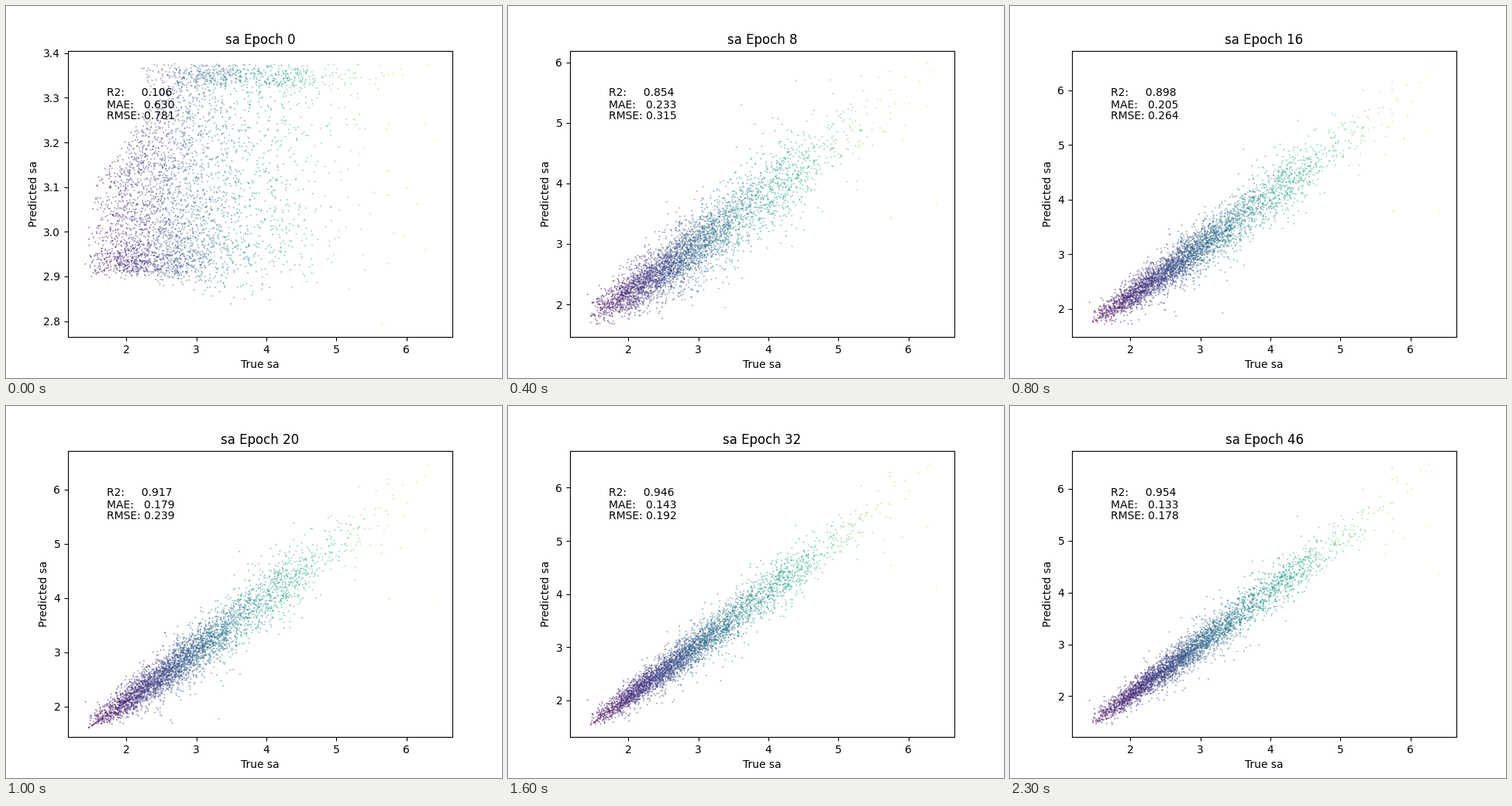
A matplotlib script for the animation above (2.4 s loop, 640 px wide and 480 px high).

```python
import numpy as np
import matplotlib.pyplot as plt
from matplotlib.animation import FuncAnimation

FRAMES, STEP = 24, 2
X_LO, X_HI = 1.417, 6.408
N = 4000
TRUE_STD = .8256

# Key points of the training log: epoch, R2, MAE, lower and upper y limit.
LOG = np.array([
    [0, .106, .630, 2.7643, 3.4054],
    [8, .854, .233, 1.461, 6.192],
    [16, .898, .205, 1.479, 6.730],
    [24, .935, .154, 1.393, 6.711],
    [32, .946, .143, 1.312, 6.698],
    [40, .950, .138, 1.230, 6.788],
    [46, .9537, .133, 1.212, 6.738],
])

# Outliers: true value, first prediction, early error, late error.
OUTLIERS = np.array([
    [X_LO, 2.928, .75, .50],
    [5.65, 2.793, -.80, -.90],
    [5.75, 3.240, -2.32, -.57],
    [6.27, 2.960, -1.00, -1.00],
    [6.27, 3.240, -.10, .20],
    [X_HI, 3.207, -2.76, -2.05],
])

rng = np.random.default_rng(7)


def true_values():
    x = np.concatenate([rng.gamma(4.6, .38, N - 150) + 1.15,
                        rng.normal(4.3, .2, 150)])
    x = x[(x > 1.46) & (x < 6.32)]
    rng.shuffle(x)
    return x


def untrained(x):
    """Squashed first predictions: a band on top, a denser floor below."""
    n = len(x)
    top = 3.376 - np.abs(rng.normal(.028, .016, n))
    reach = np.clip(.2 + .22 * (x - 1.6), .12, .42)
    power = np.clip(1.8 - .3 * (x - 2.2), 1.05, 1.8)
    fuzz = np.clip(.006 + .017 * (x - 1.9), .008, .034)
    low = 2.915 + reach * rng.random(n) ** power + rng.normal(0, fuzz)
    is_top = rng.random(n) < np.clip(.2 * (x - 2.15), 0, .4)
    return np.clip(np.where(is_top, top, low), 2.81, 3.376)


def residuals(x):
    r = rng.standard_t(8, len(x)) * np.clip(.5 + .33 * (x - 1.5), .4, 1.3)
    return r / r.std()


def log_at(epoch):
    """Interpolated log row; the first stretch drops off steeply."""
    if epoch < 8:
        t = 1 - (1 - epoch / 8) ** 5
        return LOG[0, 1:] + t * (LOG[1, 1:] - LOG[0, 1:])
    return [np.interp(epoch, LOG[:, 0], col) for col in LOG.T[1:]]


def mean_curve(x, epoch):
    """Line that straightens while its level wobbles and settles."""
    slope = 1 - .3 * np.exp(-epoch / 9)
    wobble = .18 * np.exp(-epoch / 20) * np.cos(np.pi * (epoch - 16) / 8)
    bend = .4 * np.exp(-epoch / 12 - (x - 1.5))
    return 3.5 + slope * (x - 3.5) + wobble + bend


def predictions(epoch, rmse, lo, hi):
    ox, first, early, late = OUTLIERS.T
    if epoch == 0:
        return np.concatenate([start, first])
    mean = mean_curve(x, epoch)
    spread = np.sqrt(max(rmse ** 2 - np.mean((mean - x) ** 2), .01))
    turn = 1.2 * epoch / 46
    y = mean + spread * (np.cos(turn) * res_a + np.sin(turn) * res_b)
    pad = (hi - lo) * .045
    y = np.where((y > lo + pad) & (y < hi - pad), y, mean)
    far = ox + early + (late - early) * max(epoch - 8, 0) / 38
    return np.concatenate([y, np.clip(far, lo + pad, hi - pad)])


x = true_values()
start = untrained(x)
res_a, res_b = residuals(x), residuals(x)
all_x = np.concatenate([x, OUTLIERS[:, 0]])

fig, ax = plt.subplots(figsize=(6.4, 4.8), dpi=100)
dots = ax.scatter(all_x, all_x, c=all_x, s=2, alpha=.5, linewidths=0,
                  cmap="viridis", vmin=X_LO, vmax=X_HI)
margin = (X_HI - X_LO) * .05
ax.set_xlim(X_LO - margin, X_HI + margin)
ax.set_xlabel("True sa")
ax.set_ylabel("Predicted sa")
title = ax.set_title("")
stats = [ax.text(.1, y, "", transform=ax.transAxes) for y in (.842, .80, .76)]
FORMATS = "R2:     {:.3f}", "MAE:   {:.3f}", "RMSE: {:.3f}"


def update(i):
    epoch = i * STEP
    r2, mae, lo, hi = log_at(epoch)
    rmse = TRUE_STD * np.sqrt(1 - r2)
    dots.set_offsets(np.column_stack([all_x, predictions(epoch, rmse, lo, hi)]))
    ax.set_ylim(lo, hi)
    title.set_text(f"sa Epoch {epoch}")
    for text, form, value in zip(stats, FORMATS, (r2, mae, rmse)):
        text.set_text(form.format(value))
    return [dots, title, *stats]


anim = FuncAnimation(fig, update, frames=FRAMES, interval=100, repeat=True)
plt.show()
```
